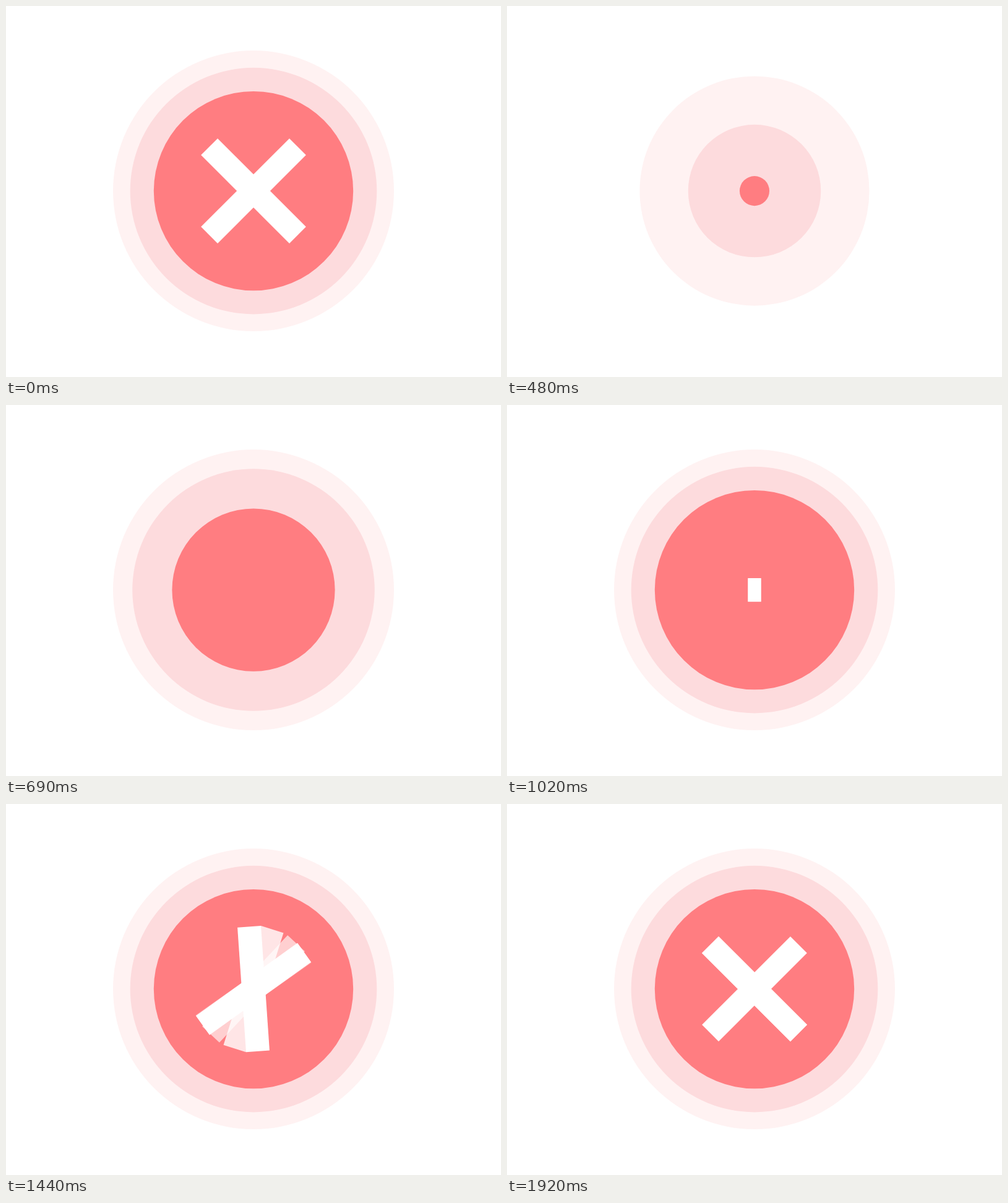
An HTML page with a canvas that plays this animation: 800x600 px, repeating every 2.25 s.

```html
<!DOCTYPE html>
<html lang="en">
<head>
<meta charset="utf-8">
<title>Error badge</title>
<style>
  html, body { margin: 0; width: 100%; height: 100%; overflow: hidden; background: #fff; }
  canvas { display: block; }
</style>
</head>
<body>
<canvas id="stage" width="800" height="600"></canvas>
<script>
const ctx = document.getElementById('stage').getContext('2d');
const LOOP = 2250, STEP = 30, RESTART = 120;
const CX = 400, CY = 299.1, BAR_LENGTH = 202, BAR_WIDTH = 38;

// Growing discs, largest first; times in ms.
const discs = [
  { radius: 227, color: '#fff2f2', start: 120, duration: 495 },
  { radius: 199.3, color: '#fddbdd', start: 201, duration: 531 },
  { radius: 161.2, color: '#ff7d81', start: 374, duration: 435 }
];

// Trail of the faster bar: delay in ms and opacity, oldest first.
const trail = [[84, 0.25], [66, 0.63], [30, 0.8]];

function ease(t, start, duration) {
  const x = Math.min(1, Math.max(0, (t - start) / duration));
  return x * x * (3 - 2 * x);
}

// Swing past the resting angle by 10 degrees, then settle back.
function swing(t, rest) {
  return 10 * ease(t, 1560, 300) - (rest + 10) * ease(t, 1260, 300);
}

function drawDisc({ radius, color, start, duration }, t) {
  ctx.fillStyle = color;
  ctx.beginPath();
  ctx.arc(0, 0, radius * ease(t, start, duration), 0, 2 * Math.PI);
  ctx.fill();
}

function drawBar(length, degrees, alpha = 1) {
  ctx.save();
  ctx.rotate(degrees * Math.PI / 180);
  ctx.globalAlpha = alpha;
  ctx.fillStyle = '#fff';
  ctx.fillRect(-length / 2, -BAR_WIDTH / 2, length, BAR_WIDTH);
  ctx.restore();
}

function draw(t) {
  ctx.setTransform(1, 0, 0, 1, 0, 0);
  ctx.fillStyle = '#fff';
  ctx.fillRect(0, 0, 800, 600);
  ctx.translate(CX, CY);
  for (const disc of discs) drawDisc(disc, t);

  const length = BAR_LENGTH * ease(t, 960, 300);
  if (t > 1260 && t < 1980) {
    for (const [delay, alpha] of trail) drawBar(length, swing(t - delay, 135), alpha);
  }
  drawBar(length, swing(t, 45));
  drawBar(length, swing(t, 135));
}

const origin = performance.now();
function tick() {
  const elapsed = (performance.now() - origin) % LOOP;
  const t = Math.floor(elapsed / STEP) * STEP;
  draw(t < RESTART ? LOOP : t);
  requestAnimationFrame(tick);
}
tick();
</script>
</body>
</html>
```
